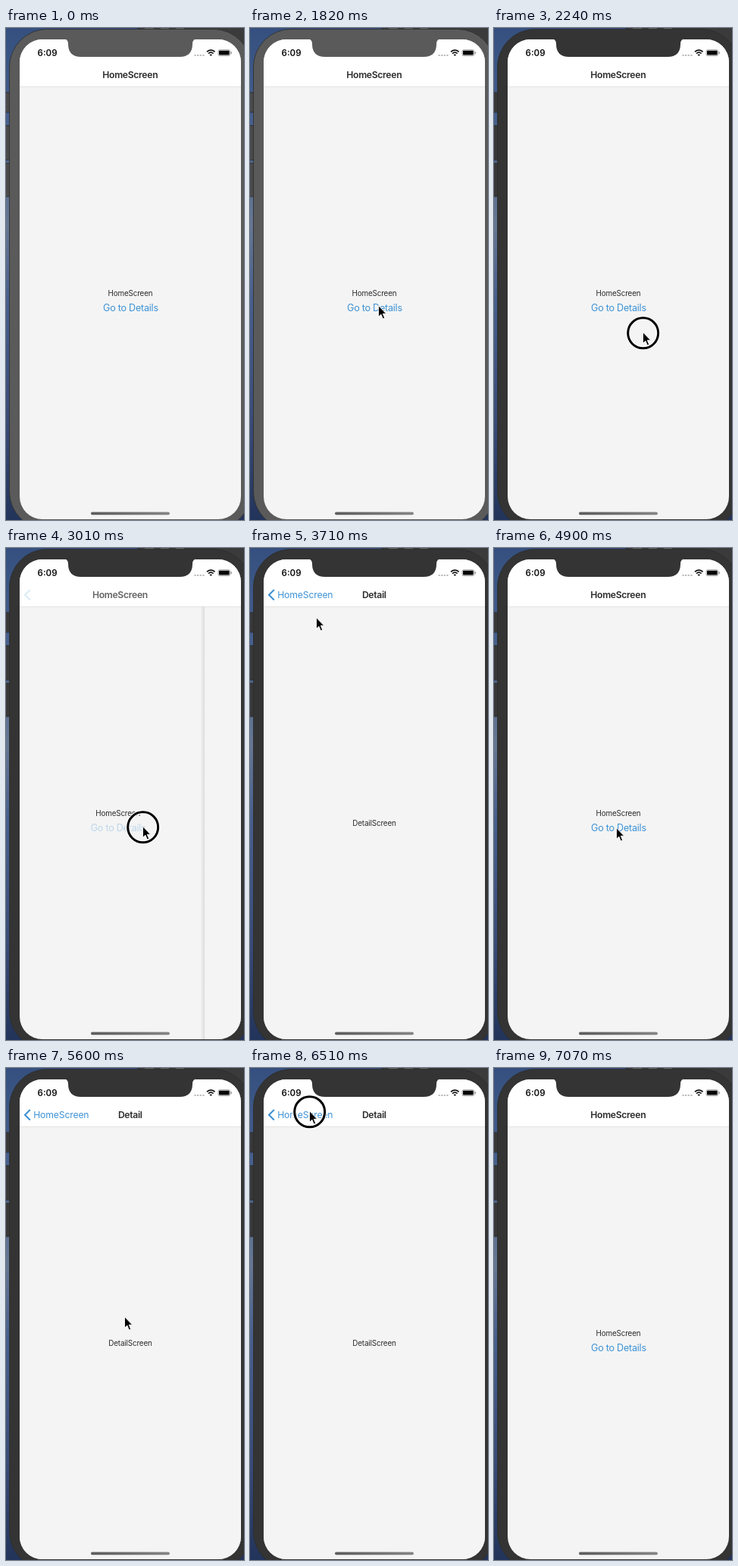
Write an HTML page that moves like this. It is 314 px wide and 648 px high and loops after 7140 ms.

```html
<!DOCTYPE html>
<html lang="en">
<head>
<meta charset="utf-8">
<title>Stack navigation</title>
<style>
  html, body { margin: 0; width: 100%; height: 100%; overflow: hidden; background: #343434; }
  svg { display: block; width: 100%; height: 100%; }
  text { font-family: Inter, Roboto, sans-serif; fill: #2b2b2b; }
  .title { font-size: 12.2px; font-weight: 600; letter-spacing: -.32px; text-anchor: middle; }
  .body { font-size: 9.9px; letter-spacing: -.17px; text-anchor: middle; }
  .link { font-size: 12.6px; letter-spacing: -.25px; text-anchor: middle; fill: #3d92d5; }
  .back { font-size: 12.2px; letter-spacing: -.15px; fill: #3d92d5; }
  .clock { font-size: 11.5px; font-weight: 600; fill: #111; }
  .case { fill: var(--case); }
  .key { fill: var(--key); stroke: #262626; stroke-width: .8; }
</style>
</head>
<body>
<svg id="stage" viewBox="0 0 314 648">
  <defs>
    <linearGradient id="sky" x2="0" y2="1">
      <stop offset="0" stop-color="#35507f"/>
      <stop offset=".2" stop-color="#46618f"/>
      <stop offset=".4" stop-color="#667793"/>
      <stop offset=".55" stop-color="#48608d"/>
      <stop offset=".8" stop-color="#394c78"/>
      <stop offset="1" stop-color="#22345a"/>
    </linearGradient>
    <linearGradient id="edge">
      <stop offset="0" stop-color="#000" stop-opacity="0"/>
      <stop offset="1" stop-color="#000" stop-opacity=".1"/>
    </linearGradient>
    <linearGradient id="bar">
      <stop offset="0" stop-color="#5c5c5c"/>
      <stop offset="1" stop-color="#858585"/>
    </linearGradient>
    <clipPath id="glass"><rect x="18" y="15" width="292" height="632" rx="30"/></clipPath>
  </defs>

  <rect width="314" height="648" fill="url(#sky)"/>
  <rect x="175" width="139" height="30" fill="#3b3b3b"/>
  <path d="M183 1h12M204 1h11M224 1h11" stroke="#666" stroke-width="2"/>
  <path d="M175 0v3" stroke="#111"/>
  <g class="key">
    <rect x="-2" y="85" width="7" height="26"/>
    <rect x="-2" y="128.5" width="7" height="45.5"/>
    <rect x="-2" y="178" width="7" height="44"/>
  </g>
  <rect class="case" x="4.5" y="1.5" width="319" height="659" rx="50" stroke="#2c2c2c" stroke-width=".8"/>

  <g clip-path="url(#glass)">
    <rect x="18" y="15" width="292" height="632" fill="#f4f4f4"/>
    <g id="home">
      <text class="body" x="164" y="352.5">HomeScreen</text>
      <text class="link" id="link" x="164.4" y="373.2">Go to Details</text>
    </g>
    <g id="card">
      <rect x="12" y="77" width="6" height="570" fill="url(#edge)"/>
      <rect x="18" y="77" width="292" height="570" fill="#f4f4f4"/>
      <text class="body" x="164" y="365.5">DetailScreen</text>
    </g>
    <rect x="18" y="15" width="292" height="62" fill="#fff"/>
    <path d="M18 77.3h292" stroke="#dcdcdc" stroke-width=".8"/>
    <text class="title" id="homeTitle" x="163.8" y="66.3">HomeScreen</text>
    <text class="title" id="detailTitle" x="163.8" y="66.3">Detail</text>
    <path id="chevron" d="M31.8 55 25 61.8l6.8 6.8" fill="none" stroke="#3d92d5" stroke-width="2.1"/>
    <text class="back" id="backLabel" x="36.2" y="66.3">HomeScreen</text>

    <text class="clock" x="41.6" y="36.8">6:09</text>
    <path d="M248.5 36h13" stroke="#bbb" stroke-width="1.8" stroke-dasharray="2.2 1.4"/>
    <g fill="none" stroke="#111" stroke-width="1.7">
      <path d="M265 31.3q5.3-4.4 10.6 0M267 33.6q3.3-2.8 6.6 0"/>
    </g>
    <path d="M268.5 35.1q1.8-1.4 3.6 0l-1.8 1.9z" fill="#111"/>
    <rect x="280" y="28.8" width="15.6" height="7.8" rx="1.8" fill="#fff" stroke="#777" stroke-width=".7"/>
    <rect x="281" y="29.8" width="13.6" height="5.8" rx=".8" fill="#050505"/>
    <path d="M297.2 31.3v2.8" stroke="#777" stroke-width="1.1"/>
    <rect x="112" y="637.6" width="104" height="3.6" rx="1.8" fill="url(#bar)"/>
  </g>
  <path class="case" d="M77 14.5q5 .5 5 6.5 0 17 17 17h130q17 0 17-17 0-6 5-6.5z"/>

  <g id="ring" fill="none">
    <circle r="20" stroke="#fff" stroke-width="5.4"/>
    <circle r="20" stroke="#000" stroke-width="3"/>
  </g>
  <path id="cursor" d="M.5.7v14.6l3.4-3.1 2.4 5.7 2.4-1-2.4-5.6h4.4z" fill="#000" stroke="#fff" stroke-width=".9"/>
</svg>
<script>
const LOOP = 7140, STEP = 70, SLIDE = 500;
const byId = id => document.getElementById(id);
const stage = byId('stage');

// time, x, y of the pointer tip
const path = [
  [840, 280, 435], [980, 215, 330], [1120, 111, 260], [1400, 150, 335],
  [1540, 150, 335], [1820, 169, 365], [2100, 196, 400], [2310, 196, 400],
  [2730, 180, 366], [3080, 180, 366], [3710, 87, 91], [3920, 78, 59],
  [4340, 78, 59], [4760, 165, 374], [4900, 161, 368], [5110, 161, 368],
  [5600, 156, 327], [5670, 127, 237], [6160, 78, 56], [6650, 78, 56], [7000, 122, 650]
];
const clicks = [[2170, 2310], [3010, 3150], [4200, 4340], [4970, 5110], [6510, 6650]];
const presses = [[2870, 3080], [4970, 5180]];
const slides = [[2985, 1], [4320, 0], [5100, 1], [6600, 0]];
const FOCUS = 2170;

const clamp = v => Math.min(1, Math.max(0, v));
const within = (spans, t) => spans.some(([a, b]) => t >= a && t < b);

function pointer(t) {
  const i = path.findIndex(k => k[0] > t);
  if (i < 1) return null;
  const [a, x0, y0] = path[i - 1], [b, x1, y1] = path[i];
  const u = (t - a) / (b - a);
  return [x0 + (x1 - x0) * u, y0 + (y1 - y0) * u];
}

// 0 = home, 1 = detail
function progress(t) {
  const last = slides.filter(s => s[0] <= t).pop();
  if (!last) return 0;
  const rest = (1 - clamp((t - last[0]) / SLIDE)) ** 4;
  return last[1] ? 1 - rest : rest;
}

function place(id, x, y, opacity) {
  const el = byId(id);
  el.setAttribute('transform', `translate(${x.toFixed(2)} ${y.toFixed(2)})`);
  el.setAttribute('opacity', clamp(opacity).toFixed(3));
}

function render(t) {
  const p = progress(t), tip = pointer(t);
  const active = t >= FOCUS;
  stage.style.setProperty('--case', active ? '#343434' : '#5a5a5a');
  stage.style.setProperty('--key', active ? '#383838' : '#4a4a4a');

  place('home', -88 * p, 0, 1);
  place('card', 300 * (1 - p), 0, 1);
  place('homeTitle', -72 * p, 0, 1 - p / .7);
  place('detailTitle', 72 * (1 - p), 0, (p - .5) * 2);
  place('backLabel', 72 * (1 - p), 0, (p - .65) / .35);
  place('chevron', 0, 0, p);
  byId('link').setAttribute('opacity', within(presses, t) ? .3 : 1);

  const [x, y] = tip || [0, 0];
  place('cursor', x, y, tip ? 1 : 0);
  place('ring', x + .7, y + 1.8, tip && within(clicks, t) ? 1 : 0);
}

const start = performance.now();
function tick(now) {
  const t = Math.max(0, now - start) % LOOP;
  render(Math.floor(t / STEP) * STEP);
  requestAnimationFrame(tick);
}
render(0);
requestAnimationFrame(tick);
</script>
</body>
</html>
```
